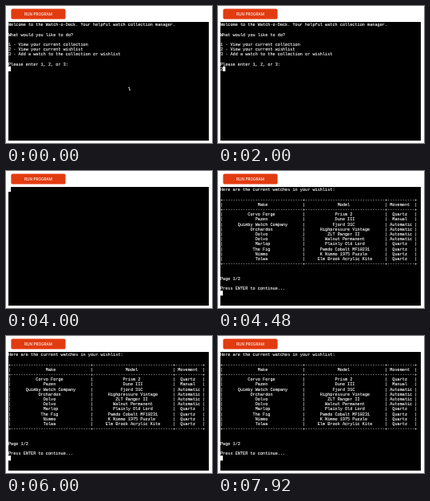
These frames come from a looping animation (258 by 172 pixels, 8000 ms). An HTML page with a canvas:

```html
<!DOCTYPE html>
<html lang="en">
<head>
<meta charset="utf-8">
<title>Watch collection terminal</title>
<style>
  html, body { margin: 0; width: 100%; height: 100%; overflow: hidden; background: #fff; }
  canvas { display: block; }
</style>
</head>
<body>
<canvas width="258" height="172"></canvas>
<script>
const ctx = document.querySelector('canvas').getContext('2d');
const LOOP = 8000, TYPED = 1840, CLEARED = 2800, LISTED = 4480;
const LEFT = 3, TOP = 20, CELL = 3.12, LINE = 6.2, BASELINE = 5.2;

const menu = [
  'Welcome to the Watch-o-Deck. Your helpful watch collection manager.',
  '',
  'What would you like to do?',
  '',
  '1 - View your current collection',
  '2 - View your current wishlist',
  '3 - Add a watch to the collection or wishlist',
  '',
  'Please enter 1, 2, or 3:'
];

const watches = [
  ['Corvo Forge', 'Prism 2', 'Quartz'],
  ['Pazen', 'Dune III', 'Manual'],
  ['Quimby Watch Company', 'Fjord 31C', 'Automatic'],
  ['Orchardon', 'Highpressure Vintage', 'Automatic'],
  ['Dolvo', 'ZLT Ranger II', 'Automatic'],
  ['Dolvo', 'Walnut Permanent', 'Automatic'],
  ['Marlop', 'Plainly Old Lord', 'Quartz'],
  ['The Fig', 'Pamdo Cobalt MF10231', 'Quartz'],
  ['Nimmo', 'K Nimmo 1975 Puzzle', 'Quartz'],
  ['Tolwa', 'Elm Brook Acrylic Kite', 'Quartz']
];

const widths = [32, 32, 11];
const center = (text, width) =>
  text.padStart(Math.floor((width + text.length) / 2)).padEnd(width);
const row = cells => '|' + cells.map((c, i) => center(c, widths[i])).join('|') + '|';
const rule = '+' + widths.map(w => '-'.repeat(w)).join('+') + '+';

const wishlist = [
  'Here are the current watches in your wishlist:',
  '',
  rule, row(['Make', 'Model', 'Movement']), rule,
  ...watches.map(row),
  rule,
  '', '',
  'Page 1/2',
  '',
  'Press ENTER to continue...'
];

// Glyphs are set at ten times their size and scaled down for exact spacing.
function glyphs(text, x, y) {
  ctx.save();
  ctx.translate(x, y);
  ctx.scale(0.1, 0.1);
  ctx.fillText(text, 0, 0);
  ctx.strokeText(text, 0, 0);
  ctx.restore();
}

function drawButton() {
  ctx.fillStyle = '#e23b10';
  ctx.beginPath();
  ctx.roundRect(6.4, 3.4, 68.2, 13.2, 2.2);
  ctx.fill();
  ctx.fillStyle = ctx.strokeStyle = '#fff';
  ctx.font = '47px Inter, sans-serif';
  ctx.textAlign = 'center';
  ctx.lineWidth = 0.5;
  glyphs('RUN PROGRAM', 40.6, 11.8);
}

function drawTerminal(lines, cursorColumn, cursorLine) {
  ctx.fillStyle = '#000';
  ctx.fillRect(LEFT, TOP, 251, 149);
  ctx.fillStyle = ctx.strokeStyle = '#fff';
  ctx.font = '52px "Liberation Mono", monospace';
  ctx.textAlign = 'left';
  ctx.lineWidth = 1;
  lines.forEach((line, n) => [...line].forEach((char, i) => {
    if (char !== ' ') glyphs(char, LEFT + i * CELL, TOP + n * LINE + BASELINE);
  }));
  ctx.fillRect(LEFT + cursorColumn * CELL, TOP + cursorLine * LINE, CELL, LINE);
}

function drawPointer() {
  ctx.fillStyle = '#aaa';
  ctx.fillRect(154, 102, 1, 4);
  ctx.fillRect(153, 102, 1, 1);
  ctx.fillRect(155, 105, 1, 1);
}

function draw(now) {
  const time = now % LOOP;
  ctx.fillStyle = '#fff';
  ctx.fillRect(0, 0, 258, 172);
  drawButton();
  if (time < TYPED) {
    drawTerminal(menu, 0, 9);
    drawPointer();
  } else if (time < CLEARED) {
    drawTerminal([...menu, '2'], 1, 9);
  } else if (time < LISTED) {
    drawTerminal([], 0, 0);
  } else {
    drawTerminal(wishlist, 0, 21);
  }
  requestAnimationFrame(() => draw(performance.now()));
}
draw(0);
</script>
</body>
</html>
```
